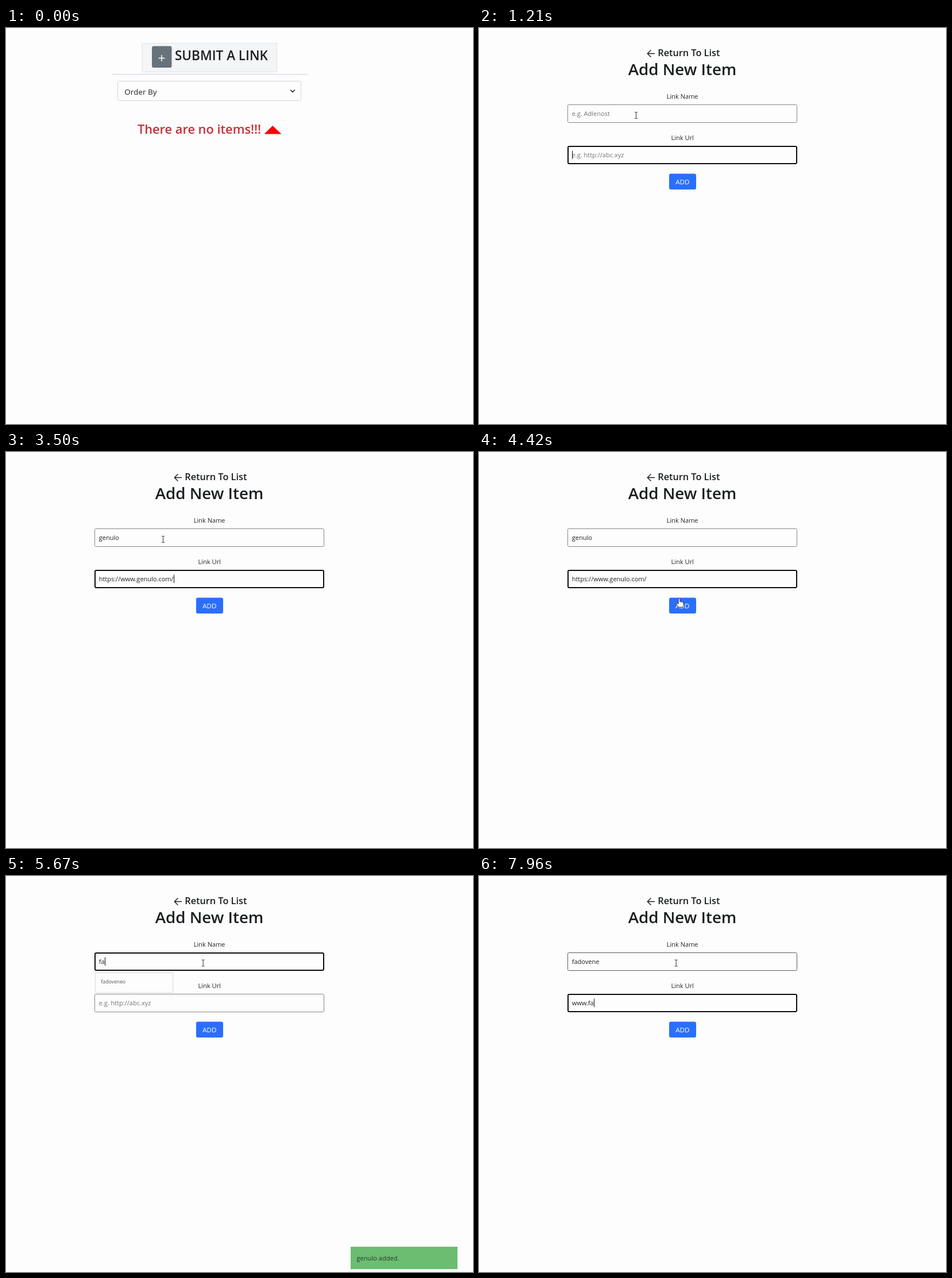
Write an HTML page that moves like this. It is 813 px wide and 689 px high and loops after 8000 ms.

```html
<!DOCTYPE html>
<html lang="en">
<head>
<meta charset="utf-8">
<title>Link list</title>
<style>
  html, body { margin: 0; width: 100%; height: 100%; overflow: hidden; background: #fdfdfd; }
  svg { display: block; width: 813px; height: 689px; }
  text { font-family: "Open Sans", "Noto Sans", sans-serif; font-size: 11px; fill: #212529; white-space: pre; }
  .mid { text-anchor: middle; }
  .head { font-weight: 600; fill: #1b1e21; }
  .menu text { font-size: 8.7px; fill: #555; }
  .menu rect { fill: #fdfdfd; stroke: #d8d8d8; }
  .line { fill: none; stroke: #1b1e21; stroke-linecap: round; stroke-linejoin: round; }
</style>
</head>
<body>
<svg viewBox="0 0 813 689" xmlns="http://www.w3.org/2000/svg">
  <rect width="813" height="689" fill="#fdfdfd"/>

  <g id="list">
    <rect x="236.5" y="26.5" width="235" height="50" fill="#f3f5f7" stroke="#e0e5e9"/>
    <rect x="254" y="31.5" width="34.5" height="37.5" rx="3" fill="#68727b"/>
    <path d="M265.5 52.5h11M271 47v11" stroke="#fff" stroke-width="1.6"/>
    <text class="head" x="294" y="56" style="font-size:22.5px">SUBMIT A LINK</text>
    <path d="M184 80.5H525" stroke="#cdd0de"/>
    <rect x="194.5" y="92.5" width="319" height="34" rx="3" fill="#fdfdfd" stroke="#d2d3d2"/>
    <text x="206.3" y="115.5" style="font-size:13.5px">Order By</text>
    <path class="line" d="M495.5 108l3.5 3.6 3.5-3.6" stroke-width="1.4"/>
    <text class="head mid" x="336.5" y="184" style="font-size:21.8px;fill:#c92f38">There are no items!!!</text>
    <path d="M449.5 184.5L464.2 170L479.5 184.5z" fill="#f60404"/>
  </g>

  <g id="form">
    <path class="line" d="M305.5 44.5H293.5M299 38.8L293.3 44.5L299 50.2" stroke-width="1.4"/>
    <text class="head mid" x="365.3" y="48.5" style="font-size:16.3px">Return To List</text>
    <text class="head mid" x="354" y="82" style="font-size:27.7px">Add New Item</text>
    <text class="mid" x="354.2" y="123">Link Name</text>
    <rect id="nameBox" rx="2" fill="#fdfdfd"/>
    <text id="nameText" x="161.7" y="153.3"></text>
    <text class="mid" x="354.2" y="194.7">Link Url</text>
    <rect id="urlBox" rx="2" fill="#fdfdfd"/>
    <text id="urlText" x="161.7" y="224.8"></text>
    <rect id="caret" width="1" height="14.5" fill="#111"/>
    <rect id="ring" x="328" y="251" width="53" height="33" rx="5" fill="#a1c1fb"/>
    <rect id="add" x="331" y="253.5" width="47" height="27.5" rx="3"/>
    <text class="mid" x="354.3" y="271.5" style="font-size:11.6px;fill:#fff">ADD</text>
    <g id="longMenu" class="menu"><rect x="155.5" y="168.5" width="135" height="161"/></g>
    <g id="shortMenu" class="menu"><rect x="155.5" y="168.5" width="135" height="34"/></g>
    <g id="toast">
      <rect x="600" y="645" width="186" height="39" fill="#6cbd72"/>
      <text x="610.5" y="669" style="font-size:11.1px;fill:#26382a">genulo added.</text>
    </g>
  </g>

  <g id="cursor" stroke-linejoin="round">
    <path id="arrow" d="M0 0V14L3.3 11L5.4 16L7.6 15L5.5 10.2H10z" fill="#fff" stroke="#222" stroke-width=".9"/>
    <path id="hand" d="M-1.4 1.2Q0-.8 1.4 1.2V6Q3 5.2 3.8 6.4Q5.2 5.8 6 7Q7.6 6.8 7.6 8.6V12Q7.4 14 6.2 15.6H-1Q-2.6 13-4.6 10.6Q-5.4 9-4 8.4Q-2.6 8.6-1.4 10z" fill="#fff" stroke="#222" stroke-width=".9"/>
    <path id="beam" d="M-2.5-5.5H-.6L0-5L.6-5.5H2.5M0-5V5M-2.5 5.5H-.6L0 5L.6 5.5H2.5" fill="none" stroke="#333"/>
  </g>
</svg>
<script>
const LOOP = 8000, FORM = 920, SUBMIT = 4640;
const $ = id => document.getElementById(id);
const clamp = v => Math.max(0, Math.min(1, v));
const span = (t, a, b) => clamp((t - a) / (b - a));
const smooth = p => p * p * (3 - 2 * p);
const show = (id, on) => $(id).setAttribute('display', on ? 'inline' : 'none');
const set = (id, attrs) => {
  for (const k in attrs) $(id).setAttribute(k, attrs[k]);
};

const LINK = 'genulo', SITE = 'fadovene', URL_TEXT = 'https://www.genulo.com/';
const fields = {
  name: { y: 133, hint: 'e.g. Adlenost' },
  url: { y: 205, hint: 'e.g. http://abc.xyz' }
};

// Input states: time, focused field, name, url
const typing = (word, times, make) => times.map((t, i) => [t, ...make(word.slice(0, i + 1))]);
const states = [
  [FORM, 'url', '', ''],
  [1800, 'name', '', ''],
  ...typing(LINK, [2400, 2580, 2710, 2840, 2960, 3080], s => ['name', s, '']),
  [3250, 'url', LINK, ''],
  [3500, 'url', LINK, URL_TEXT],
  [4590, 'button', LINK, URL_TEXT],
  [SUBMIT, 'button', '', ''],
  [5450, 'name', '', ''],
  ...typing(SITE, [5580, 5660, 5740, 5820, 5900, 6000, 6130, 6340], s => ['name', s, '']),
  [6500, 'url', SITE, ''],
  ...typing('www.fa', [7340, 7440, 7540, 7790, 7880, 7960], s => ['url', SITE, s])
];

// Pointer stops: time, x, y
const stops = [
  [90, 330, 178], [800, 272, 50], [940, 272, 50], [1190, 273.5, 152],
  [3790, 273.5, 152], [4380, 348.5, 254.5], [4720, 348.5, 254.5], [5100, 343.2, 151.5]
];

function pointer(t) {
  let i = 0;
  while (i < stops.length - 1 && stops[i + 1][0] <= t) i++;
  const a = stops[i], b = stops[i + 1] || a;
  const p = a === b ? 0 : smooth(span(t, a[0], b[0]));
  return [a[1] + (b[1] - a[1]) * p, a[2] + (b[2] - a[2]) * p];
}

function addItems(id, y, items) {
  items.forEach((word, i) => {
    const el = document.createElementNS('http://www.w3.org/2000/svg', 'text');
    el.setAttribute('x', 165.2);
    el.setAttribute('y', y + i * 24.85);
    el.textContent = word;
    $(id).append(el);
  });
}
addItems('longMenu', 189.8, ['asf', 'safas', 'asfasf', 'sadas', 'saf', 'ASDFG']);
addItems('shortMenu', 187.3, [SITE + 'o']);

function drawField(key, value, focused, hover) {
  const { y, hint } = fields[key];
  const inset = focused ? 1 : .5;
  set(key + 'Box', {
    x: 154 + inset, y: y + inset, width: 400 - 2 * inset, height: 32 - 2 * inset,
    stroke: focused ? '#0c0c0c' : hover ? '#5c5c5c' : '#87878b',
    'stroke-width': focused ? 2 : 1
  });
  const el = $(key + 'Text');
  el.textContent = value || hint;
  el.style.fill = value ? '#212121' : '#757575';
}

function drawForm(t, x, y) {
  const [since, focus, name, url] = states.filter(s => s[0] <= t).pop();
  const values = { name, url };
  const hover = t > SUBMIT && y < 165;
  drawField('name', name, focus === 'name', hover);
  drawField('url', url, focus === 'url', false);

  const typed = focus in fields;
  show('caret', typed && Math.floor((t - since) / 530) % 2 === 0);
  if (typed) {
    const width = values[focus] ? $(focus + 'Text').getComputedTextLength() : 0;
    set('caret', { x: Math.round(161.7 + width), y: fields[focus].y + 8.5 });
  }

  const pressed = focus === 'button';
  show('ring', pressed);
  set('add', { fill: pressed ? '#2359d6' : '#2a6ffb' });

  const first = span(t, 1830, 1960) * (1 - span(t, 2400, 2500));
  const second = t < 5580 ? span(t, 5450, 5540) : 0;
  set('longMenu', { opacity: Math.max(first, second) });
  set('shortMenu', { opacity: t < 5580 ? 0 : 1 - span(t, 6540, 6700) });
  drawToast(t);
}

function drawToast(t) {
  const enter = span(t, 4670, 4950), settle = span(t, 4950, 5130), leave = span(t, 6880, 7250);
  let dx = 215 - 245 * (1 - (1 - enter) ** 3);
  if (enter === 1) dx = -30 * (1 - smooth(settle));
  dx += 215 * leave * leave;
  show('toast', t >= 4670 && t < 7250);
  set('toast', { transform: `translate(${dx} 0)` });
}

function drawPointer(t, x, y) {
  const inside = (l, r, a, b) => x >= l && x <= r && y >= a && y <= b;
  const onForm = t >= FORM;
  const beam = onForm && (inside(154, 554, 133, 165) || inside(154, 554, 205, 237));
  const hand = onForm ? inside(331, 378, 253, 281) : inside(236, 472, 26, 77);
  show('cursor', t >= 90);
  show('beam', beam);
  show('hand', hand);
  show('arrow', !beam && !hand);
  set('cursor', { transform: `translate(${x} ${y})` });
}

function draw(t) {
  const [x, y] = pointer(t);
  show('list', t < FORM);
  show('form', t >= FORM);
  if (t >= FORM) drawForm(t, x, y);
  drawPointer(t, x, y);
}

const start = performance.now();
function tick(now) {
  draw(Math.max(0, now - start) % LOOP);
  requestAnimationFrame(tick);
}
draw(0);
requestAnimationFrame(tick);
</script>
</body>
</html>
```
